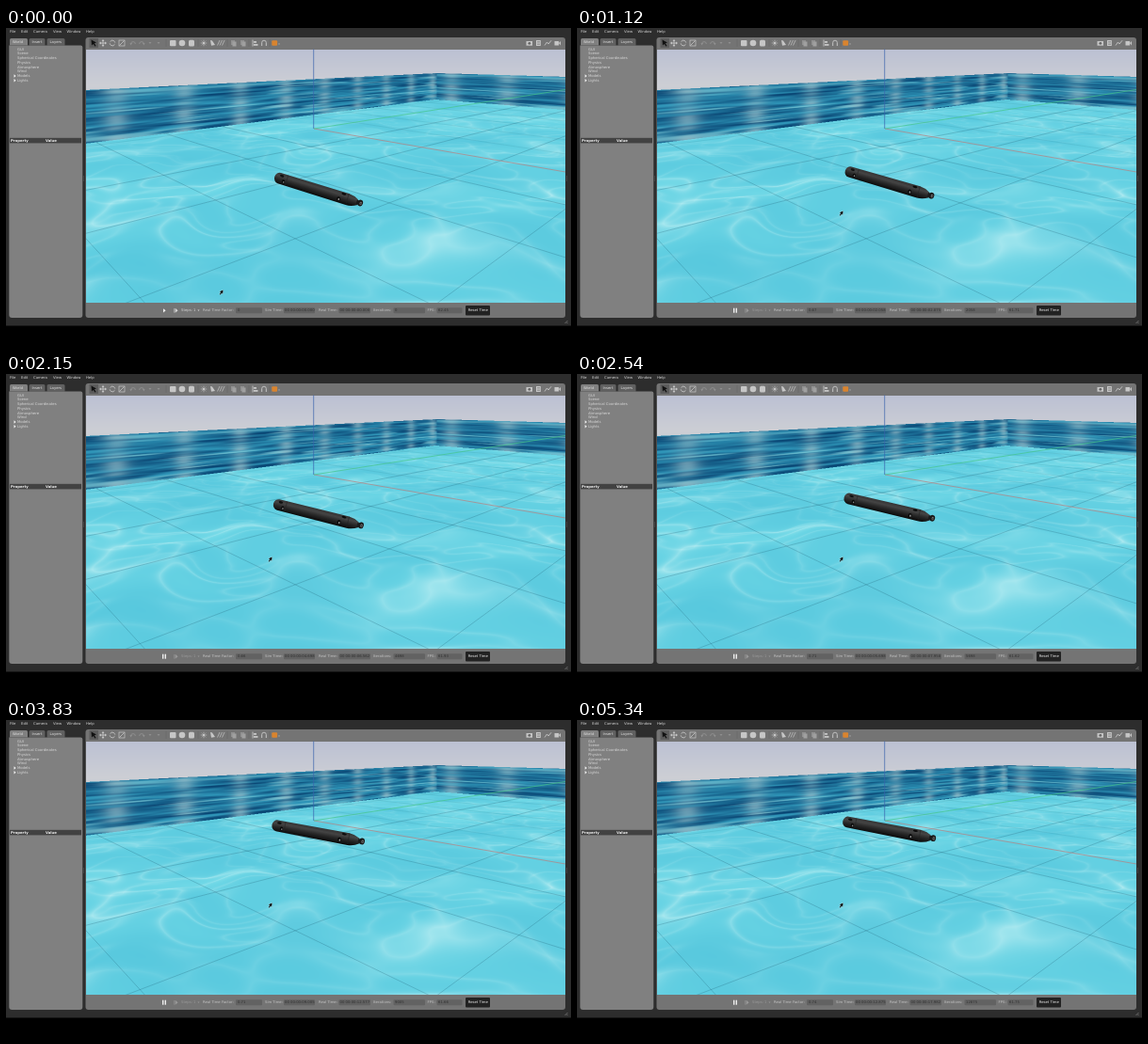
An HTML page with a canvas for the animation above (5.41 s loop, 600 by 338 pixels).

```html
<!DOCTYPE html>
<html lang="en">
<head>
<meta charset="utf-8">
<title>Underwater vehicle simulation</title>
<style>
html, body { margin: 0; width: 100%; height: 100%; overflow: hidden; background: #000; }
canvas { display: block; width: 600px; height: 338px; }
</style>
</head>
<body>
<canvas id="stage" width="600" height="338"></canvas>
<script>
const LOOP = 5.41, PLAY_AT = 0.318;
const VIEW = { x: 84.5, y: 22.5, w: 509.5, h: 269.5 };
// Vanishing points, world origin and grid steps of the floor perspective
const HORIZON = 31.5, VP_GREEN = 813, VP_RED = -91;
const ORIGIN = { x: 327, y: 107 }, STEP_U = 0.0965, STEP_V = 0.106;

const stage = document.getElementById('stage').getContext('2d');
let g = stage;

const clamp = (x, a = 0, b = 1) => Math.min(b, Math.max(a, x));
const mix = (a, b, k) => a + (b - a) * k;
const mixRgb = (a, b, k) => a.map((c, i) => mix(c, b[i], k));
const smooth = k => k * k * (3 - 2 * k);

function hash(x, y) {
  let n = Math.imul(x, 374761393) ^ Math.imul(y, 668265263);
  n = Math.imul(n ^ (n >>> 13), 1274126177);
  return ((n ^ (n >>> 16)) >>> 0) / 4294967296;
}

function noise(x, y) {
  const i = Math.floor(x), j = Math.floor(y), a = smooth(x - i), b = smooth(y - j);
  return mix(mix(hash(i, j), hash(i + 1, j), a), mix(hash(i, j + 1), hash(i + 1, j + 1), a), b);
}

function rect(x, y, w, h, color) {
  g.fillStyle = color;
  g.fillRect(x, y, w, h);
}

function panel(x, y, w, h, color, radii) {
  g.fillStyle = color;
  g.beginPath();
  g.roundRect(x, y, w, h, radii);
  g.fill();
}

function line(points, color, width = 0.6) {
  g.strokeStyle = color;
  g.lineWidth = width;
  g.beginPath();
  points.forEach(p => g.lineTo(...p));
  g.stroke();
}

function poly(points, color) {
  g.fillStyle = color;
  g.beginPath();
  points.forEach(p => g.lineTo(...p));
  g.fill();
}

function oval(x, y, rx, ry, color) {
  g.fillStyle = color;
  g.beginPath();
  g.ellipse(x, y, rx, ry, 0, 0, 7);
  g.fill();
}

function ring(x, y, r, color, from = 0, to = 6.3) {
  g.strokeStyle = color;
  g.lineWidth = 0.9;
  g.beginPath();
  g.arc(x, y, r, from, to);
  g.stroke();
}

function text(s, x, y, color = '#d4d4d4', bold = false) {
  g.font = (bold ? 'bold ' : '') + '3.8px "DejaVu Sans", sans-serif';
  g.textBaseline = 'middle';
  g.fillStyle = color;
  g.fillText(s, x, y);
}

function layer(w, h, paint) {
  const c = document.createElement('canvas');
  c.width = w;
  c.height = h;
  g = c.getContext('2d');
  paint(c);
  g = stage;
  return c;
}

// ---- pool scene ----
function wallColor(h, q, seed) {
  const streak = noise(h * 0.8 + seed, q * 20 + seed) * 0.6 + noise(h * 1.7, q * 34 + seed) * 0.4;
  let c = mixRgb([9, 70, 116], [46, 148, 183], clamp((streak - 0.25) * 1.9));
  c = mixRgb(c, [122, 200, 214], clamp((noise(h * 1.2, q * 25 + 40) - 0.66) * 2.6));
  const d = h - Math.round(h);
  const haze = Math.exp(-d * d * 32) * (0.1 + 0.65 * noise(h * 0.7, q * 18 + 9));
  return mixRgb(c, [156, 192, 202], haze);
}

// Wavy light streaks, drawn out along the screen's horizontal
function floorColor(x, y) {
  const depth = (ORIGIN.y - HORIZON) / (y - HORIZON);
  const kv = (x * depth - ORIGIN.x - VP_GREEN * (depth - 1)) / (VP_GREEN - VP_RED);
  const u = (depth - 1 + kv) / STEP_U, v = kv / STEP_V;
  const along = (u + v) * 1.15;
  const across = (u - v) * 1.8 + 1.9 * noise(along * 1.3, (u - v) * 0.9 + 50);
  const ridge = f => 1 - Math.abs(2 * noise(along * f, across * f) - 1);
  const detail = clamp(1.25 - depth * 0.6, 0.3, 1);
  const patch = noise(along * 0.8 + 20, across * 0.7);
  const glow = (Math.pow(ridge(1), 8) * 0.5 + Math.pow(ridge(1.9), 6) * 0.32) * detail * (0.3 + patch);
  const base = mixRgb([86, 199, 221], [112, 217, 231], clamp(patch * 0.9 + (1 - detail) * 0.2));
  return mixRgb(base, [190, 239, 243], clamp(glow));
}

function sceneColor(x, y) {
  const left = x < 457.5;
  const top = left ? 66 - 0.0481 * (x - 84) : 48 + 0.029 * (x - 458);
  const bottom = left ? 123 - 0.1263 * (x - 84) : 76 + 0.08 * (x - 457);
  if (y < top) return mixRgb([187, 192, 211], [204, 206, 212], clamp((y - 22) / 38));
  if (y > bottom) return floorColor(x, y);
  const h = (left ? 1 / (VP_GREEN - x) : 1 / (x - VP_RED)) / 0.000168;
  return wallColor(h - 0.55, (y - top) / (bottom - top), left ? 3 : 17);
}

function project(u, v) {
  const a = u * STEP_U, b = v * STEP_V, d = 1 + a - b;
  return [(ORIGIN.x + a * VP_GREEN - b * VP_RED) / d, (ORIGIN.y + (a - b) * HORIZON) / d];
}

const texture = layer(VIEW.w * 2, VIEW.h * 2, c => {
  const img = g.createImageData(c.width, c.height);
  for (let j = 0, p = 0; j < c.height; j++)
    for (let i = 0; i < c.width; i++) {
      const [r, gr, b] = sceneColor(VIEW.x + i / 2 + 0.25, VIEW.y + j / 2 + 0.25);
      img.data[p++] = r;
      img.data[p++] = gr;
      img.data[p++] = b;
      img.data[p++] = 255;
    }
  g.putImageData(img, 0, 0);
});

// Extends a floor line from its vanishing point far past the view
function floorLine(vx, [x, y], color) {
  line([[vx, HORIZON], [vx + (x - vx) * 9, HORIZON + (y - HORIZON) * 9]], color, 0.5);
}

function paintScene() {
  g.drawImage(texture, VIEW.x, VIEW.y, VIEW.w, VIEW.h);
  g.save();
  g.beginPath();
  [[84.5, 123], [456, 76], [594, 87], [594, 292], [84.5, 292]].forEach(p => g.lineTo(...p));
  g.clip();
  const near = 'rgba(20,75,95,.45)', far = 'rgba(20,75,95,.18)';
  for (let n = 1; n <= 6; n++) {
    floorLine(VP_RED, project(-n, 0), near);
    floorLine(VP_RED, project(n, 0), far);
    floorLine(VP_GREEN, project(0, n), near);
    floorLine(VP_GREEN, project(0, -n), far);
  }
  g.restore();
  line([[327, 107], [594, 153]], '#b8807f', 0.7);
  line([[327, 107], [594, 65.5]], '#45c68c', 0.7);
  line([[326.7, 22.5], [326.7, 107]], '#3a62ad', 0.7);
}

// ---- window furniture ----
function paintTools() {
  const light = '#c6c6c6', dim = '#909090';
  rect(88.5, 11, 9.5, 10, '#5c5c5c');
  poly([[90.5, 12.5], [96, 15.5], [93.8, 16.3], [95.6, 19], [94.4, 19.6], [92.7, 17], [91, 18.5]], '#111');
  line([[99.8, 16], [106.2, 16]], light, 0.9);
  line([[103, 12.8], [103, 19.2]], light, 0.9);
  for (const [dx, dy] of [[1, 0], [-1, 0], [0, 1], [0, -1]])
    poly([[103 + dx * 4, 16 + dy * 4], [103 + dx * 2 + dy * 1.4, 16 + dy * 2 + dx * 1.4],
      [103 + dx * 2 - dy * 1.4, 16 + dy * 2 - dx * 1.4]], light);
  ring(113, 16, 2.8, light, 0.5, 3);
  ring(113, 16, 2.8, light, 3.7, 6.1);
  g.strokeStyle = light;
  g.lineWidth = 0.7;
  g.strokeRect(120, 13, 6, 6);
  line([[120.5, 18.5], [125.5, 13.5]], light, 0.8);
  for (const [x, s] of [[135, -1], [144, 1], [153, -1], [162, 1]]) {
    if (x > 150) { poly([[x - 1.5, 15], [x + 1.5, 15], [x, 17]], dim); continue; }
    ring(x, 17, 2.4, dim, Math.PI, 6.28);
    poly([[x + s * 3.5, 16], [x + s * 1, 16], [x + s * 2.4, 18.5]], dim);
  }
  panel(174, 13, 6.5, 6.2, light, 1);
  oval(187, 16, 3.3, 3.3, light);
  panel(194, 12.8, 6, 6.6, light, 1.5);
  oval(210, 16, 1.5, 1.5, light);
  for (let a = 0; a < 6.2; a += Math.PI / 4)
    line([[210 + 2 * Math.cos(a), 16 + 2 * Math.sin(a)], [210 + 3.3 * Math.cos(a), 16 + 3.3 * Math.sin(a)]], light);
  poly([[217, 13], [219, 13.5], [222, 18], [218, 18.8]], light);
  for (const x of [226, 228.5, 231]) line([[x + 1, 13], [x - 1.5, 18.5]], light, 0.7);
  for (const x of [239, 249]) {
    rect(x, 13, 4, 5, dim);
    rect(x + 1.5, 14.5, 4, 5, '#a0a0a0');
  }
  line([[262, 12.5], [262, 19.5]], light, 0.9);
  rect(263, 14, 3, 1.8, light);
  rect(263, 17, 4.5, 1.8, light);
  ring(274, 15.5, 2.3, light, Math.PI, 6.28);
  line([[271.7, 15.5], [271.7, 19]], light, 1);
  line([[276.3, 15.5], [276.3, 19]], light, 1);
  panel(282.3, 13.2, 5.8, 5.6, '#d9842f', 1);
  poly([[289, 16.5], [291, 16.5], [290, 18]], '#a8a8a8');
  for (const x of [170, 204, 235, 258, 280]) line([[x, 12], [x, 20]], '#606060', 0.5);
  rect(552.5, 14, 6.5, 4.7, light);
  oval(555.8, 16.3, 1.4, 1.4, '#666');
  rect(563, 13, 4.8, 6, light);
  for (const y of [14.5, 16, 17.5]) line([[564, y], [567, y]], '#666', 0.5);
  line([[572, 18.5], [574.5, 15], [576, 17], [579, 13.3]], light, 0.9);
  rect(582.5, 14, 4.5, 4.5, light);
  poly([[587, 16], [589, 14], [589, 18.5]], light);
}

function paintFrame() {
  rect(0, 0, 600, 338, '#000');
  rect(0, 0, 600, 316.5, '#2d2d2d');
  [['File', 4], ['Edit', 16], ['Camera', 29], ['View', 50], ['Window', 64.5], ['Help', 85]]
    .forEach(([s, x]) => text(s, x, 3.8));
  [['World', 4, 19, '#808080'], ['Insert', 24.5, 17, '#606060'], ['Layers', 43.5, 19, '#606060']]
    .forEach(([s, x, w, c]) => {
      panel(x, 11, w, 7.5, c, [1.5, 1.5, 0, 0]);
      text(s, x + 3, 15, '#e4e4e4');
    });
  panel(3.3, 18.5, 78, 289.5, '#808080', [0, 2, 3, 3]);
  ['GUI', 'Scene', 'Spherical Coordinates', 'Physics', 'Atmosphere', 'Wind', 'Models', 'Lights'].forEach((s, i) => {
    const y = 22.7 + i * 4.72;
    text(s, 12, y, '#d8d8d8');
    if (i > 5) poly([[8.5, y - 1.7], [10.5, y], [8.5, y + 1.7]], '#f4f4f4');
  });
  rect(4, 116.8, 76, 5.6, '#424242');
  text('Property', 5, 119.8, '#eee', true);
  text('Value', 42, 119.8, '#eee', true);
  panel(VIEW.x, 10, VIEW.w, 298, '#747474', 3);
  paintTools();
  paintScene();
  for (const x of [82.5, 595.5])
    for (const y of [157.5, 159.5, 161.5]) rect(x - 0.4, y, 0.9, 0.9, '#666');
  line([[593.5, 314], [596.5, 311]], '#888', 0.7);
  line([[595.5, 314], [596.5, 313]], '#888', 0.7);
  [['Real Time Factor:', 209], ['Sim Time:', 275], ['Real Time:', 332], ['Iterations:', 390], ['FPS:', 447.5]]
    .forEach(([s, x]) => text(s, x, 300.5, '#c4c4c4'));
  [[244, 28], [295, 33], [353.5, 33.5], [411.5, 33.5], [457.5, 27]]
    .forEach(([x, w]) => panel(x, 297.3, w, 6, '#626262', 1));
  panel(488, 295, 26, 10.5, '#222', 1);
  text('Reset Time', 490.7, 300.4, '#eee');
}

const backdrop = layer(600, 338, paintFrame);

// ---- moving parts ----
// Smooth curve through [time, ...values] keys that never overshoots them
function curve(keys, t, k) {
  const last = keys.length - 1;
  if (t <= keys[0][0]) return keys[0][k];
  if (t >= keys[last][0]) return keys[last][k];
  const rate = n => (keys[n + 1][k] - keys[n][k]) / (keys[n + 1][0] - keys[n][0]);
  const slope = n => {
    if (n < 1 || n >= last) return 0;
    const a = rate(n - 1), b = rate(n);
    return a * b > 0 ? 2 * a * b / (a + b) : 0;
  };
  const i = keys.findIndex(p => p[0] > t) - 1;
  const span = keys[i + 1][0] - keys[i][0], s = (t - keys[i][0]) / span;
  return mix(keys[i][k], keys[i + 1][k], smooth(s))
    + span * s * (1 - s) * ((1 - s) * slope(i) - s * slope(i + 1));
}

// time, tail height, nose height
const RISE = [[0.32, 159.6, 186], [0.72, 157.1, 183], [1.52, 148, 172.3], [2.15, 139, 160.9],
  [3.01, 124.4, 144], [3.83, 112.3, 129], [4.15, 109, 126], [5.34, 108.5, 125.6]];
const POINTER = [[0, 230.5, 278.5], [0.2, 168, 300], [0.36, 168, 300], [0.74, 282.5, 194.5]];

function paintVehicle(t) {
  const tail = curve(RISE, t, 1), nose = curve(RISE, t, 2);
  const risen = (159.6 - tail) / 51;
  const x = 290.3 - 2.7 * risen, dx = 376.2 + 2 * risen - x, dy = nose - tail;
  const size = Math.hypot(dx, dy) / 88;
  g.save();
  g.translate(x, tail);
  g.rotate(Math.atan2(dy, dx));
  g.scale(size, size);
  const shade = g.createLinearGradient(0, -6, 0, 6);
  [[0, '#333'], [0.3, '#444'], [0.6, '#282828'], [1, '#0b0b0b']].forEach(s => shade.addColorStop(...s));
  g.fillStyle = shade;
  g.beginPath();
  g.moveTo(0, 5.7);
  g.ellipse(0, 0, 5.2, 5.7, 0, Math.PI / 2, Math.PI * 1.5);
  g.lineTo(74, -6);
  g.quadraticCurveTo(80, -5.8, 85, -2.6);
  g.lineTo(86, 2.6);
  g.quadraticCurveTo(80, 6.4, 74, 6.4);
  g.fill();
  line([[8, -5.4], [8, 5.4]], '#252525', 0.5);
  line([[74, -5.8], [74, 5.8]], '#222', 0.5);
  oval(2, -3, 2.2, 1.2, '#111');
  oval(5, 2.2, 1.5, 1.9, '#080808');
  oval(5.4, 2.7, 0.7, 0.9, '#858585');
  oval(65, 2.3, 1.8, 2.1, '#080808');
  oval(65.4, 2.8, 0.8, 1.1, '#959595');
  oval(69, -4, 2.4, 1.1, '#0c0c0c');
  rect(84, -2, 4, 4, '#1b1b1b');
  oval(88, 0, 2.8, 3.3, '#191919');
  oval(88.6, 0.2, 1.2, 1.7, '#777');
  oval(88.8, 0.3, 0.6, 0.9, '#222');
  g.restore();
}

function clock(s) {
  const m = Math.floor(s / 60);
  return '00 00:' + String(m).padStart(2, '0') + ':' + (s - m * 60).toFixed(3).padStart(6, '0');
}

function paintStatus(t) {
  const playing = t >= PLAY_AT;
  const real = Math.max(0, t - PLAY_AT) * 3.58, sim = real * 0.716;
  const ink = '#303030', side = playing ? '#999' : '#d4d4d4';
  if (playing) {
    rect(166, 297.7, 1.4, 5, '#eee');
    rect(168.6, 297.7, 1.4, 5, '#eee');
  } else poly([[167, 298.2], [169.6, 300.3], [167, 302.4]], '#eee');
  rect(178.5, 298, 0.9, 4.6, side);
  poly([[180, 298], [182.6, 300.2], [180, 302.6]], side);
  text('Steps: 1', 186, 300.5, side);
  poly([[203.5, 299.6], [205.5, 299.6], [204.5, 301]], side);
  text(playing ? (0.7 + 0.04 * Math.sin(t * 5)).toFixed(2) : '0', 246, 300.5, ink);
  text(clock(sim), 296, 300.5, ink);
  text(clock(real), 354.5, 300.5, ink);
  text(String(Math.round(sim * 1000)), 413, 300.5, ink);
  text((62 + 0.45 * Math.cos(Math.floor(t * 4))).toFixed(2), 459, 300.5, ink);
}

function paintPointer(t) {
  g.save();
  g.translate(curve(POINTER, t, 1), curve(POINTER, t, 2));
  const shape = [[0, 0], [-3.7, 1.7], [-2.2, 2.4], [-3.8, 4.4], [-2.9, 5], [-1.3, 3], [-0.4, 4.2]];
  line([...shape, shape[0]], 'rgba(225,245,248,.6)', 0.7);
  poly(shape, '#080808');
  g.restore();
}

function frame(now) {
  const t = (now / 1000) % LOOP;
  g.drawImage(backdrop, 0, 0);
  paintVehicle(t);
  paintStatus(t);
  paintPointer(t);
}

const start = performance.now();
(function tick() {
  frame(performance.now() - start);
  requestAnimationFrame(tick);
})();
</script>
</body>
</html>
```
